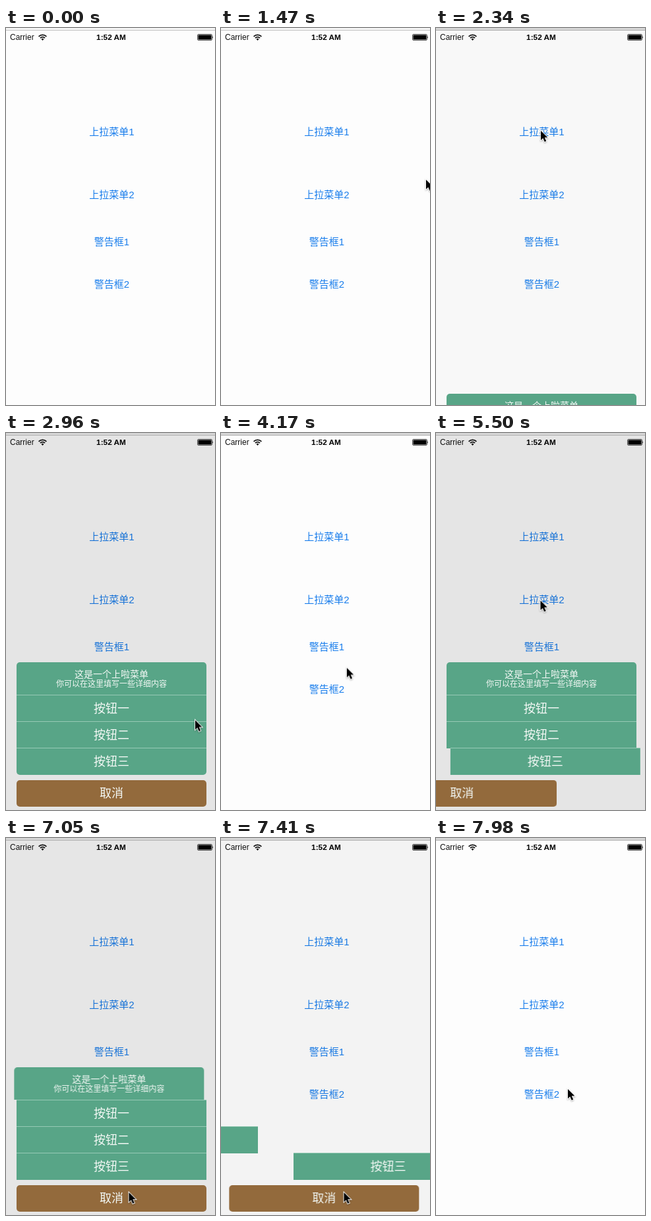
These frames come from a looping animation (317x569 px, 8 s). An HTML page:

```html
<!DOCTYPE html>
<html lang="zh-CN">
<head>
<meta charset="utf-8">
<title>上拉菜单</title>
<style>
  html, body { margin: 0; width: 100%; height: 100%; overflow: hidden; }
  #stage {
    position: absolute; left: 0; top: 0; width: 317px; height: 569px;
    overflow: hidden; background: #fdfdfd;
    font: 15px/20px "Liberation Sans", "Noto Sans CJK SC", "Noto Sans CJK", sans-serif;
  }
  #stage * { position: absolute; box-sizing: border-box; }
  #stage svg * { position: static; }

  /* every animation shares one 8 s loop */
  .bar, .dim, .sheet, .slide > div, .cursor { animation: 8s linear infinite; }

  .bar { left: 0; top: 0; width: 100%; height: 4px; border-bottom: 1px solid #c4c4c4; animation-name: bar; }
  .carrier { left: 6px; top: 4px; font-size: 12px; color: #111; }
  .clock { left: 0; top: 4px; width: 319px; text-align: center; font-size: 11.8px; font-weight: bold; color: #000; }
  .icons { left: 0; top: 0; }

  .link { left: 0; width: 321px; text-align: center; color: #1a7eec; }
  .dim { left: 0; top: 4px; width: 100%; height: 565px; background: #000; opacity: 0; animation-name: dim; }

  .sheet, .slide { left: 0; top: 0; width: 317px; height: 569px; }
  .sheet { animation-name: rise; }
  .head, .item, .cancel {
    left: 16px; width: 288px; height: 40px; line-height: 40px;
    background: #58a587; color: #f3f8f5; text-align: center; font-size: 18px; font-weight: 300;
  }
  .head { top: 346px; height: 49px; border-radius: 5px 5px 0 0; line-height: 20px; }
  .head b, .head i { left: 0; width: 100%; font-style: normal; font-weight: 300; }
  .head b { top: 8px; font-size: 14px; }
  .head i { top: 23px; font-size: 12px; }
  .item { height: 41px; border-top: 1px solid #96cab5; }
  .item:nth-child(2) { top: 395px; }
  .item:nth-child(3) { top: 435px; }
  .item:nth-child(4) { top: 475px; }
  .cancel { top: 524px; border-radius: 5px; background: #936a3c; }
  .sheet .item:nth-child(4) { border-radius: 0 0 5px 5px; }

  .slide > div { --off: -317px; transform: translateX(var(--off)); }
  .slide > div:nth-child(even) { --off: 317px; }
  .slide > :nth-child(1) { animation-name: side1; }
  .slide > :nth-child(2) { animation-name: side2; }
  .slide > :nth-child(3) { animation-name: side3; }
  .slide > :nth-child(4) { animation-name: side4; }
  .slide > :nth-child(5) { animation-name: side5; }

  .cursor { left: 0; top: 0; overflow: visible; filter: drop-shadow(0 1px 1px rgba(0, 0, 0, .3)); animation-name: point; }

  @keyframes bar {
    0%, 27.74% { background: #f5f5f5; border-color: #c4c4c4; }
    27.75%, 100% { background: #d6d6d6; border-color: #b2b2b2; }
  }
  @keyframes dim {
    0%, 28.5%, 49.75%, 61.625%, 95.75%, 100% { opacity: 0; }
    32.25%, 46%, 65.375%, 87.85% { opacity: .095; }
  }
  @keyframes rise {
    0%, 28.5% { transform: translateY(225px); animation-timing-function: ease-in-out; }
    32.25%, 46% { transform: none; animation-timing-function: ease-in-out; }
    49.75%, 100% { transform: translateY(225px); }
  }
  @keyframes side1 {
    0%, 61.625% { transform: translateX(var(--off)); animation-timing-function: ease-in-out; }
    65.375%, 87.85% { transform: translateX(0); animation-timing-function: ease-in-out; }
    91.6%, 100% { transform: translateX(var(--off)); }
  }
  @keyframes side2 {
    0%, 62.875% { transform: translateX(var(--off)); animation-timing-function: ease-in-out; }
    66.625%, 88.975% { transform: translateX(0); animation-timing-function: ease-in-out; }
    92.725%, 100% { transform: translateX(var(--off)); }
  }
  @keyframes side3 {
    0%, 64.125% { transform: translateX(var(--off)); animation-timing-function: ease-in-out; }
    67.875%, 90.1% { transform: translateX(0); animation-timing-function: ease-in-out; }
    93.85%, 100% { transform: translateX(var(--off)); }
  }
  @keyframes side4 {
    0%, 65.375% { transform: translateX(var(--off)); animation-timing-function: ease-in-out; }
    69.125%, 91.225% { transform: translateX(0); animation-timing-function: ease-in-out; }
    94.975%, 100% { transform: translateX(var(--off)); }
  }
  @keyframes side5 {
    0%, 66.625% { transform: translateX(var(--off)); animation-timing-function: ease-in-out; }
    70.375%, 92.35% { transform: translateX(0); animation-timing-function: ease-in-out; }
    96.1%, 100% { transform: translateX(var(--off)); }
  }
  @keyframes point {
    0%, 18.36% { transform: translate(400px, 228px); }
    18.37%, 18.95% { transform: translate(310px, 228px); animation-timing-function: ease-out; }
    24.125%, 35% { transform: translate(158px, 154px); }
    37% { transform: translate(286px, 432px); }
    38.5% { transform: translate(282px, 490px); animation-timing-function: ease-out; }
    42.375%, 49.5% { transform: translate(188px, 533px); }
    52.125% { transform: translate(190px, 354px); animation-timing-function: ease-out; }
    55.875%, 56.25% { transform: translate(168px, 269px); animation-timing-function: ease-out; }
    58.625%, 76.25% { transform: translate(157.5px, 252px); animation-timing-function: ease-in; }
    79.125% { transform: translate(207px, 390px); }
    80.375% { transform: translate(211px, 445px); animation-timing-function: ease-out; }
    83.625%, 97.9% { transform: translate(185.5px, 534px); }
    99.75%, 100% { transform: translate(199px, 378px); }
  }
</style>
</head>
<body>
<div id="stage">
  <div class="bar"></div>
  <div class="carrier">Carrier</div>
  <div class="clock">1:52 AM</div>

  <div class="link" style="top:147px">上拉菜单1</div>
  <div class="link" style="top:242px">上拉菜单2</div>
  <div class="link" style="top:313px">警告框1</div>
  <div class="link" style="top:377px">警告框2</div>

  <svg class="icons" width="317" height="24">
    <g fill="none" stroke="#111" stroke-width="1.7">
      <path d="M49.6 12.9a8.2 8.2 0 0 1 11.8 0"/>
      <path d="M51.9 15.1a5 5 0 0 1 7.2 0"/>
    </g>
    <path d="M55.5 19l-2-2.2a2.8 2.8 0 0 1 4 0z" fill="#111"/>
    <rect x="290.5" y="9.5" width="22" height="9" rx="1.5" fill="none" stroke="#555"/>
    <rect x="291.5" y="10.5" width="20" height="7" rx=".6"/>
    <path d="M313.4 12.3q1.6 1.7 0 3.4z"/>
  </svg>

  <div class="dim"></div>

  <div class="sheet">
    <div class="head"><b>这是一个上啦菜单</b><i>你可以在这里填写一些详细内容</i></div>
    <div class="item">按钮一</div>
    <div class="item">按钮二</div>
    <div class="item">按钮三</div>
    <div class="cancel">取消</div>
  </div>

  <div class="slide">
    <div class="head"><b>这是一个上啦菜单</b><i>你可以在这里填写一些详细内容</i></div>
    <div class="item">按钮一</div>
    <div class="item">按钮二</div>
    <div class="item">按钮三</div>
    <div class="cancel">取消</div>
  </div>

  <svg class="cursor" width="14" height="20">
    <path d="M1 1V15.2L4.3 12.2 6.7 17.8 9.2 16.8 6.8 11.3H11.3Z" stroke="#fff" stroke-width="1.8" paint-order="stroke"/>
  </svg>
</div>
</body>
</html>
```
